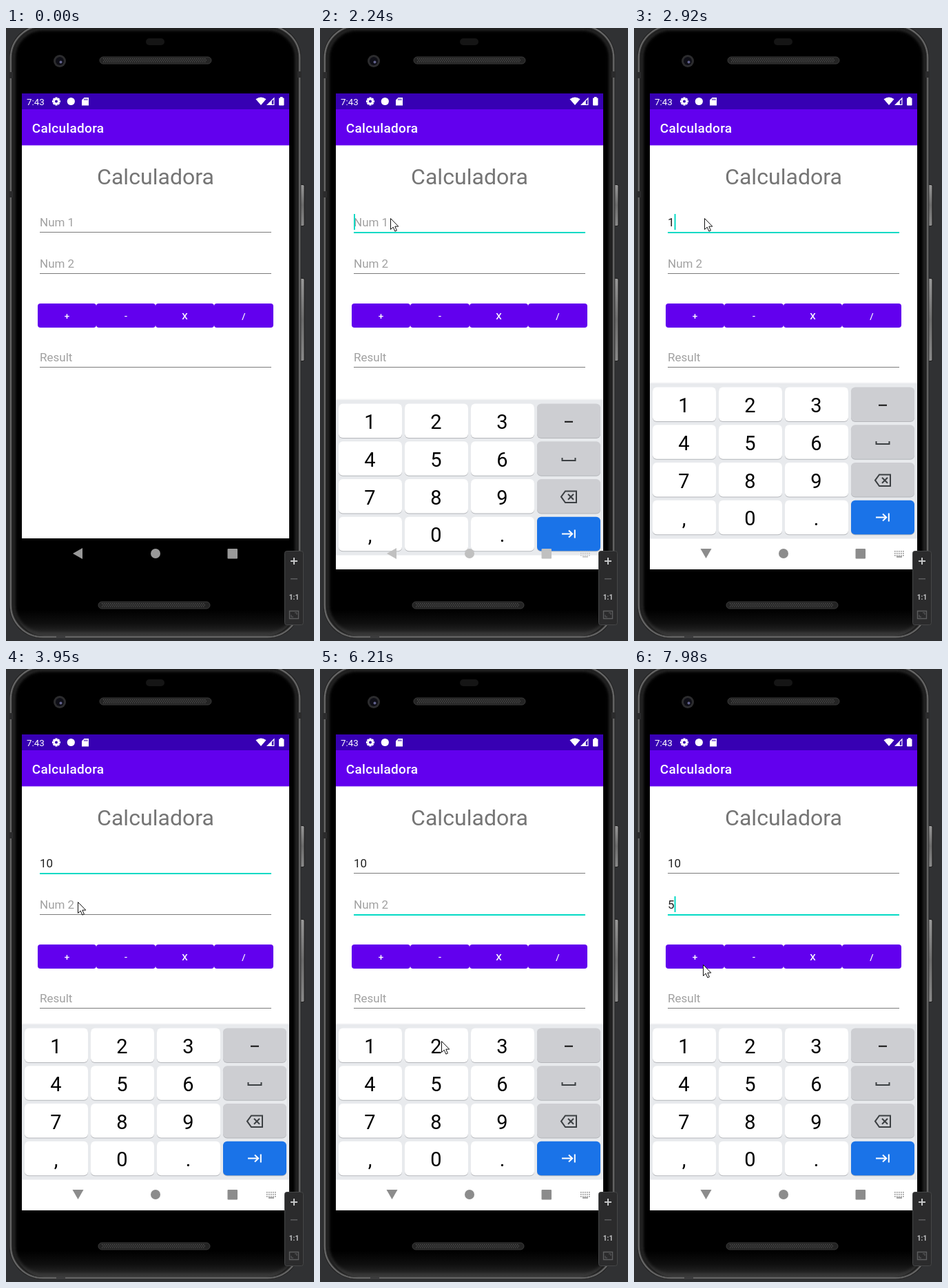
An HTML page with a canvas that plays this animation: 447x890 px, repeating every 8 s.

```html
<!DOCTYPE html>
<html lang="es">
<head>
<meta charset="utf-8">
<title>Calculadora</title>
<style>
html, body { margin: 0; width: 100%; height: 100%; overflow: hidden; background: #303133; }
canvas { display: block; }
</style>
</head>
<body>
<canvas id="stage" width="447" height="890"></canvas>
<script>
const ctx = document.getElementById('stage').getContext('2d');
const LOOP = 8000;
const PURPLE = '#6200ee', TEAL = '#03dac5', NAV_GREY = '#999999';
const FONT = 'Roboto, sans-serif';

// Keyframes: [time, ...values]
const POINTER = [
  [690, 398, 646], [900, 240, 470], [1100, 172, 392], [1300, 112, 237], [1440, 101, 264],
  [1570, 102, 276], [3610, 102, 276], [3880, 107, 340], [3950, 104, 338], [5010, 104, 338],
  [5280, 163, 495], [5480, 174, 536], [5950, 174, 536], [6210, 176, 540], [6350, 176, 540],
  [6680, 189, 593], [7230, 189, 593], [7800, 100, 429]
];
const KEYBOARD_DROP = [[2240, 24], [2310, 11], [2370, 4.5], [2440, 0]];
const BACK_TURN = [[2440, 0], [2700, 1]];
const NAV_TONE = [[2370, 192], [2640, 140]];

const FIELDS = [
  { hint: 'Num 1', y: 296, focus: 1770, blur: 4360, touch: 102,
    values: [[2920, '1'], [3120, '10']],
    caret: [[1840, 2720], [2920, 3610], [4160, 4360]] },
  { hint: 'Num 2', y: 356, focus: 4360, blur: Infinity, touch: 104,
    values: [[6950, '5']],
    caret: [[4490, 5010], [5510, 6010], [6510, 7450], [7950, LOOP]] },
  { hint: 'Result', y: 492, focus: Infinity, blur: Infinity, values: [], caret: [] }
];

const clamp = v => Math.max(0, Math.min(1, v));
const grey = v => `rgb(${v},${v},${v})`;

function sample(keys, t) {
  if (t <= keys[0][0]) return keys[0].slice(1);
  for (let i = 1; i < keys.length; i++) {
    const a = keys[i - 1], b = keys[i];
    if (t < b[0]) {
      const p = (t - a[0]) / (b[0] - a[0]);
      return a.slice(1).map((v, k) => v + (b[k + 1] - v) * p);
    }
  }
  return keys[keys.length - 1].slice(1);
}

function rect(x, y, w, h, color) {
  ctx.fillStyle = color;
  ctx.fillRect(x, y, w, h);
}

function round(x, y, w, h, r, fill, stroke, width = 1) {
  ctx.beginPath();
  ctx.roundRect(x, y, w, h, r);
  paint(fill, stroke, width);
}

function circle(x, y, r, fill) {
  ctx.beginPath();
  ctx.arc(x, y, r, 0, Math.PI * 2);
  paint(fill);
}

function poly(points, fill, stroke, width = 1, close = true) {
  ctx.beginPath();
  points.forEach(([x, y]) => ctx.lineTo(x, y));
  if (close) ctx.closePath();
  paint(fill, stroke, width);
}

function paint(fill, stroke, width) {
  if (fill) { ctx.fillStyle = fill; ctx.fill(); }
  if (stroke) { ctx.strokeStyle = stroke; ctx.lineWidth = width; ctx.stroke(); }
}

function gradient(x0, y0, x1, y1, ...colors) {
  const g = ctx.createLinearGradient(x0, y0, x1, y1);
  colors.forEach((c, i) => g.addColorStop(i / (colors.length - 1), c));
  return g;
}

function text(str, x, y, size, color, { weight = 400, align = 'left', spacing = 0 } = {}) {
  ctx.font = `${weight} ${size}px ${FONT}`;
  ctx.letterSpacing = `${spacing}px`;
  ctx.textAlign = align;
  ctx.fillStyle = color;
  ctx.fillText(str, x, y);
}

function grille(x, y) {
  round(x, y, 162, 10, 5, '#242424', '#3a3a3a');
  for (let i = 0; i < 50; i++) {
    for (let row = 0; row < 3; row++) {
      rect(x + 5 + i * 3 + (row % 2) * 1.5, y + 2 + row * 2.2, 1.4, 1.2, '#565656');
    }
  }
}

function drawPhone() {
  rect(0, 0, 447, 890, '#303133');
  for (const [y, h] of [[227, 60], [363, 120]]) {
    round(426.5, y + 0.5, 6.5, h, 2, gradient(0, y, 0, y + h, '#9a9a9a', '#6c6c6c', '#8a8a8a'), '#1c1c1c');
  }
  const edge = { x: 5, y: -5, w: 423, h: 891, r: 48 };
  round(edge.x, edge.y, edge.w, edge.h, edge.r, '#000');
  // Metal rim fading into black glass
  for (let i = 0; i < 14; i++) {
    const level = 110 * Math.exp(-(((i - 1.5) / 1.5) ** 2)) + 34 * Math.exp(-(((i - 6) / 3.5) ** 2));
    round(edge.x + i + 0.5, edge.y + i + 0.5, edge.w - 2 * i - 1, edge.h - 2 * i - 1,
      edge.r - i, null, grey(Math.round(level)), 1.6);
  }
  ctx.save();
  ctx.beginPath();
  ctx.roundRect(edge.x + 9, edge.y, edge.w - 18, edge.h - 3, edge.r - 6);
  ctx.clip();
  rect(0, 845, 447, 45, gradient(0, 845, 0, 884, 'rgba(60,60,60,0)', 'rgba(60,60,60,.25)', 'rgba(70,70,70,.7)'));
  ctx.restore();
  for (const [x, y] of [[4, 64], [4, 237], [423, 63], [423, 821]]) rect(x, y, 6, 9, '#2b2b2c');
  rect(73, 882, 13, 4, '#3c3c3d');
  round(203, 15, 27, 10, 5, '#151515');
  grille(136, 42);
  grille(134, 833);
  circle(78, 48, 9, '#2c2c2e');
  circle(78, 48, 6, '#0e0e16');
  circle(79.5, 49.5, 2, '#62628c');
}

function drawGear(x, y) {
  ctx.save();
  ctx.translate(x, y);
  for (let i = 0; i < 4; i++) {
    rect(-1.6, -6, 3.2, 12, '#fff');
    ctx.rotate(Math.PI / 4);
  }
  ctx.restore();
  circle(x, y, 4.5, '#fff');
  circle(x, y, 2, '#3700b3');
}

function drawStatusBar() {
  rect(23, 95, 388, 23, '#3700b3');
  text('7:43', 30, 111.5, 13.4, '#fff');
  drawGear(73, 106.5);
  circle(94.3, 106.5, 5.6, '#fff');
  poly([[113.5, 101], [120, 101], [120, 112.5], [110, 112.5], [110, 104.5]], '#fff');
  for (const x of [113.3, 115.3, 117.3]) rect(x, 102.5, 1, 2.5, '#3700b3');

  ctx.beginPath();
  ctx.moveTo(370, 112);
  ctx.lineTo(362.5, 103.2);
  ctx.quadraticCurveTo(370, 97.8, 377.5, 103.2);
  ctx.closePath();
  paint('#fff');
  poly([[389.5, 100.5], [389.5, 112], [378, 112]], '#fff');
  poly([[388.3, 103.5], [388.3, 110.8], [385.8, 110.8], [385.8, 106]], '#3700b3');
  round(396, 101.5, 7.5, 11, 1, '#fff');
  rect(398, 100, 3.5, 2, '#fff');
}

function drawField(field, t) {
  const { y, hint, focus, blur, touch } = field;
  const typed = field.values.filter(([at]) => t >= at).pop();
  const value = typed ? typed[1] : '';
  text(value || hint, 49, y - 8, 17, value ? '#212121' : '#a1a1a1');
  rect(49, y, 336, 1, '#7b7b7b');

  const grow = clamp((t - focus) / 230);
  if (grow > 0 && t < blur + 200) {
    const left = touch - (touch - 49) * grow;
    const right = touch + (385 - touch) * grow;
    ctx.globalAlpha = t < blur ? 0.4 + 0.6 * grow : 1 - (t - blur) / 200;
    rect(left, y, right - left, 2, TEAL);
    ctx.globalAlpha = 1;
  }
  if (field.caret.some(([on, off]) => t >= on && t < off)) {
    ctx.font = `400 17px ${FONT}`;
    ctx.letterSpacing = '0px';
    rect(49 + ctx.measureText(value).width, y - 26, 2, 23, TEAL);
  }
}

function drawApp(t) {
  rect(23, 95, 388, 646, '#ffffff');
  drawStatusBar();
  rect(23, 118, 388, 52.4, PURPLE);
  text('Calculadora', 37.7, 152, 19, '#fff', { weight: 500, spacing: 0.3 });
  text('Calculadora', 217, 227, 32.1, '#757575', { align: 'center' });
  FIELDS.forEach(field => drawField(field, t));
  ['+', '-', 'X', '/'].forEach((label, i) => {
    const left = Math.round(45.6 + i * 85.6);
    const right = Math.round(45.6 + (i + 1) * 85.6);
    round(left, 400, right - left, 35, 4, PURPLE);
    text(label, (left + right) / 2, 423, 13.4, '#fff', { weight: 500, align: 'center' });
  });
}

function drawKeyIcon(row, x, y) {
  const ink = '#3c4043';
  if (row === 0) rect(x - 6, y - 0.5, 12, 2, '#111');
  if (row === 1) poly([[x - 9.5, y - 2], [x - 9.5, y + 2], [x + 9.5, y + 2], [x + 9.5, y - 2]], null, ink, 2, false);
  if (row === 2) {
    poly([[x - 11, y], [x - 5, y - 8.3], [x + 11, y - 8.3], [x + 11, y + 8.3], [x - 5, y + 8.3]], null, ink, 2);
    for (const s of [-1, 1]) poly([[x - 1, y - 4 * s], [x + 7, y + 4 * s]], null, ink, 2);
  }
  if (row === 3) {
    poly([[x - 10, y - 1], [x + 5, y - 1]], null, '#fff', 2);
    poly([[x, y - 6], [x + 5.2, y - 1], [x, y + 4]], null, '#fff', 2, false);
    poly([[x + 8.8, y - 7], [x + 8.8, y + 5]], null, '#fff', 2);
  }
}

function drawKeyboard(t) {
  const [drop] = sample(KEYBOARD_DROP, t);
  ctx.save();
  ctx.beginPath();
  ctx.rect(23, 95, 388, 691);
  ctx.clip();
  ctx.translate(0, drop);
  rect(23, 514.5, 388, 1.5, '#f3f4f5');
  rect(23, 516, 388, 226, '#e8eaed');
  rect(23, 741.5, 388, 45, '#ffffff');
  ['123', '456', '789', ',0.'].forEach((labels, row) => {
    const y = 521.4 + row * 54.75;
    for (let col = 0; col < 4; col++) {
      const x = 27 + col * 96;
      const pressed = labels[col] === '5' && t >= 6810 && t < 6950;
      const face = col < 3 ? (pressed ? '#e4e4e4' : '#ffffff') : row < 3 ? '#cdced2' : '#1a73e8';
      round(x, y + 1, 92, 49.5, 6, '#b4b6ba');
      round(x, y, 92, 49.5, 6, face);
      if (col < 3) text(labels[col], x + 45.5, y + 36.6, 29, '#000', { align: 'center' });
      else drawKeyIcon(row, x + 46, y + 25.8);
    }
  });
  ctx.restore();
}

function drawNav(t) {
  const color = t >= 2240 ? grey(Math.round(sample(NAV_TONE, t)[0])) : NAV_GREY;
  const [turn] = sample(BACK_TURN, t);
  ctx.save();
  ctx.translate(104.5, 763 - turn * 0.5);
  ctx.rotate(-turn * Math.PI / 2);
  poly([[-7.5, 0], [6.5, -8], [6.5, 8]], color);
  ctx.restore();
  circle(217, 763, 7, color);
  round(321.5, 756, 14.5, 14.5, 1, color);
  if (t >= 1970) {
    for (let row = 0; row < 3; row++) {
      for (let i = 0; i < 5; i++) rect(378 + i * 3, 759 + row * 3, 1.6, 1.6, color);
    }
    rect(381, 767, 8, 1.6, color);
  }
}

function drawToolPanel() {
  round(404.5, 759.5, 27, 107, 3, '#2b2b2c', '#454647');
  rect(413, 773, 10, 2, '#c4c5c6');
  rect(417, 769, 2, 10, '#c4c5c6');
  rect(413, 799, 10, 1.5, '#5c5d5e');
  text('1:1', 418, 829.5, 10, '#c4c5c6', { weight: 700, align: 'center' });
  round(411.5, 846.5, 13, 11, 0, null, '#5c5d5e', 1.4);
  poly([[414, 852], [414, 855], [417, 855]], null, '#5c5d5e', 1, false);
  poly([[419, 849], [422, 849], [422, 852]], null, '#5c5d5e', 1, false);
}

function drawPointer(t) {
  if (t < 690) return;
  const [x, y] = sample(POINTER, t);
  ctx.save();
  ctx.translate(x + 0.5, y + 0.5);
  poly([[0, 0], [0, 16], [3.7, 12.6], [6.3, 18.6], [8.9, 17.5], [6.3, 11.6], [11.3, 11.6]], '#fff', '#111');
  ctx.restore();
}

function draw(t) {
  drawPhone();
  drawApp(t);
  if (t >= 2240) drawKeyboard(t);
  drawNav(t);
  drawToolPanel();
  drawPointer(t);
}

let start;
function tick(now) {
  start ??= now;
  draw((now - start) % LOOP);
  requestAnimationFrame(tick);
}
requestAnimationFrame(tick);
</script>
</body>
</html>
```
